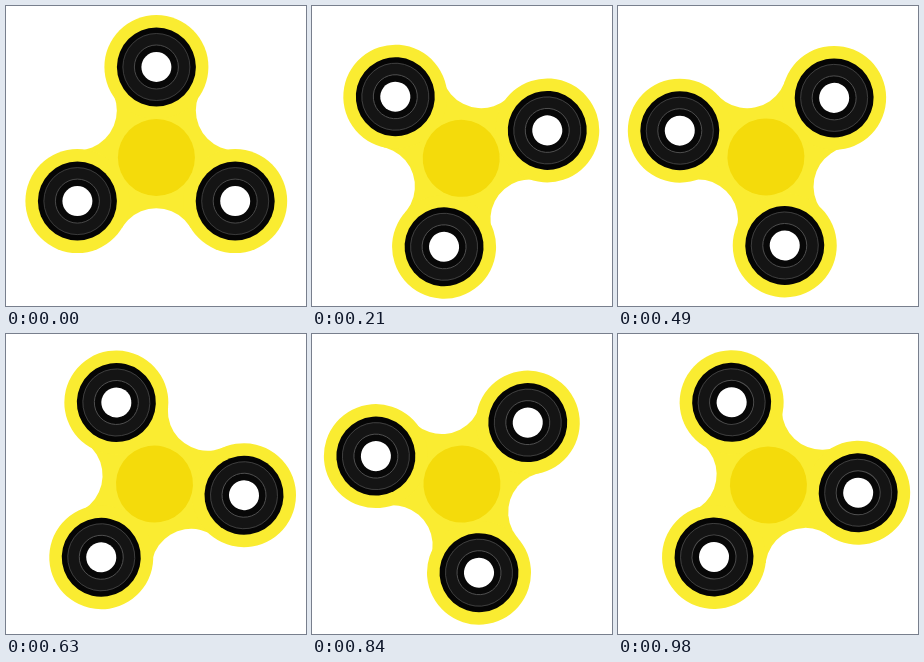
Write an HTML page with a canvas that moves like this. It is 300x300 px and loops after 1050 ms.

```html
<!DOCTYPE html>
<html lang="en">
<head>
<meta charset="utf-8">
<title>Spinner</title>
<style>
  html, body { margin: 0; width: 100%; height: 100%; overflow: hidden; background: #fff; }
  canvas { display: block; width: 300px; height: 300px; }
</style>
</head>
<body>
<canvas id="stage" width="300" height="300"></canvas>
<script>
const ctx = document.getElementById('stage').getContext('2d');
const STEP = 70, STEPS = 15, TURN = Math.PI * 2;
const PIVOT = { x: 149.2, y: 151.1 };
// Positions relative to the pivot; arms in clockwise order
const ARMS = [{ x: 1.2, y: -90.1 }, { x: 80, y: 44 }, { x: -77.8, y: 44 }];
const HUB = { x: 1.2, y: 0.4 };
const LOBE = 52, NOTCH = 40, NOTCH_DIST = 91.8;
const YELLOW = '#faec31';

const mid = {
  x: ARMS.reduce((sum, a) => sum + a.x, 0) / 3,
  y: ARMS.reduce((sum, a) => sum + a.y, 0) / 3
};

// Centres of the hollows between neighbouring arms
const NOTCHES = ARMS.map((_, i) => {
  const a = TURN * (i / 3 - 1 / 12);
  return { x: mid.x + NOTCH_DIST * Math.cos(a), y: mid.y + NOTCH_DIST * Math.sin(a) };
});

function disc({ x, y }, r, color) {
  ctx.beginPath();
  ctx.arc(x, y, r, 0, TURN);
  ctx.fillStyle = color;
  ctx.fill();
}

function ring({ x, y }, r, color, width) {
  ctx.beginPath();
  ctx.arc(x, y, r, 0, TURN);
  ctx.strokeStyle = color;
  ctx.lineWidth = width;
  ctx.stroke();
}

function body() {
  ctx.beginPath();
  ARMS.forEach((arm, i) => {
    ctx.lineTo(arm.x, arm.y);
    ctx.lineTo(NOTCHES[i].x, NOTCHES[i].y);
  });
  ctx.fillStyle = YELLOW;
  ctx.fill();
  NOTCHES.forEach(n => disc(n, NOTCH, '#fff'));
  ARMS.forEach(a => disc(a, LOBE, YELLOW));
}

function bearing(arm) {
  disc(arm, 39.5, '#050505');
  disc(arm, 34, '#141414');
  ring(arm, 33.5, '#444', 0.8);
  disc(arm, 22, '#080808');
  ring(arm, 22, '#505050', 0.9);
  disc(arm, 15, '#fff');
}

function draw(now) {
  const step = Math.floor(now / STEP) % STEPS;
  ctx.fillStyle = '#fff';
  ctx.fillRect(0, 0, 300, 300);
  ctx.save();
  ctx.translate(PIVOT.x, PIVOT.y);
  ctx.rotate(step / STEPS * TURN);
  body();
  disc(HUB, 38.5, '#f4db0b');
  ARMS.forEach(bearing);
  ctx.restore();
}

let start;
function tick(now) {
  start ??= now;
  draw(now - start);
  requestAnimationFrame(tick);
}
draw(0);
requestAnimationFrame(tick);
</script>
</body>
</html>
```
